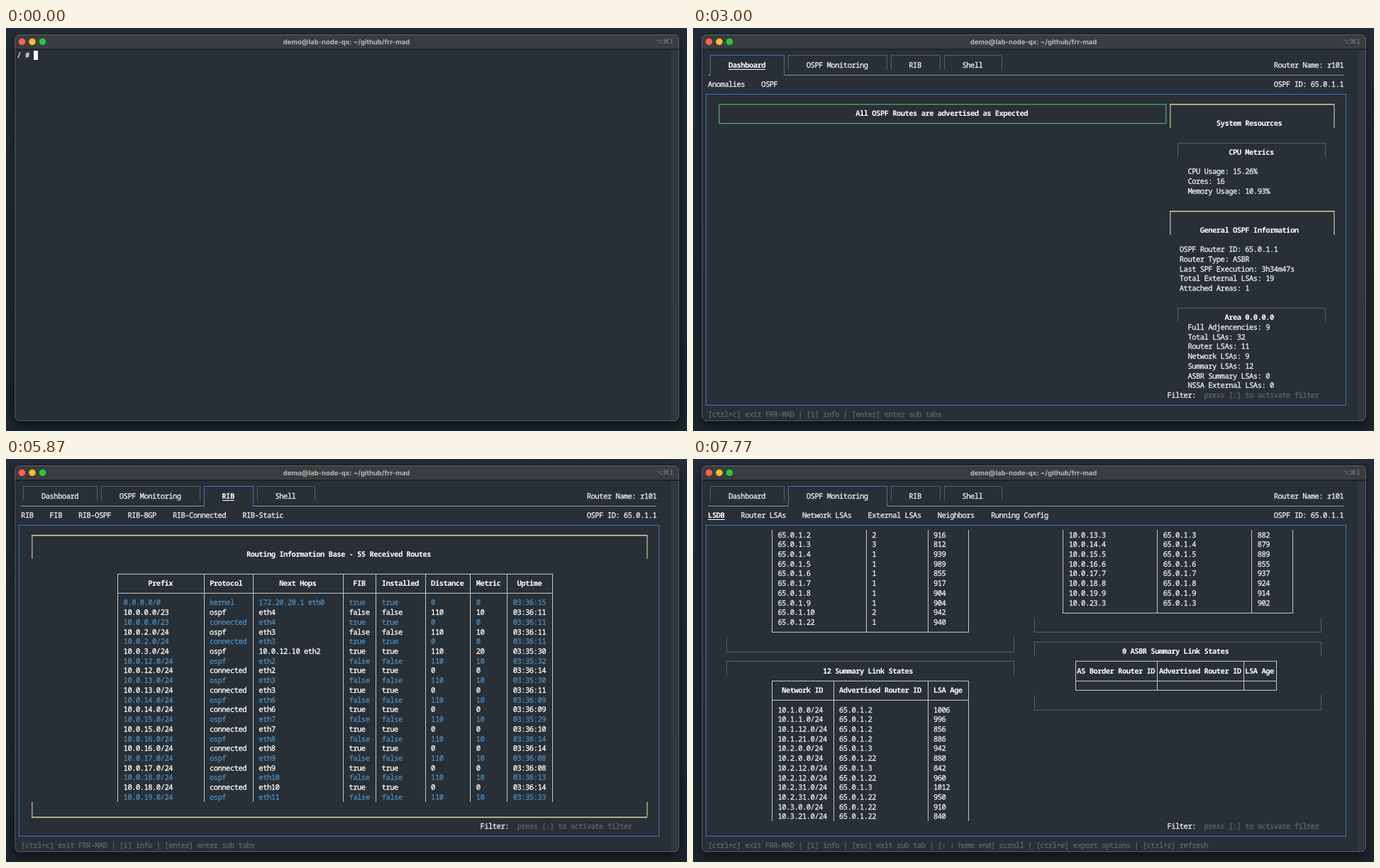
Animation, 960 px wide and 569 px high, one loop 8000 ms. Source, as an HTML page with a canvas:

```html
<!DOCTYPE html>
<html lang="en">
<head>
<meta charset="utf-8">
<title>Terminal routing dashboard</title>
<style>
  html, body { margin: 0; width: 100%; height: 100%; overflow: hidden; background: #1d262f; }
  canvas { display: block; width: 960px; height: 569px; }
</style>
</head>
<body>
<canvas id="stage"></canvas>
<script>
const W = 960, H = 569, LOOP = 8000;
const CW = 5.78, RH = 13.72, X0 = 15.6, Y0 = 31.25;
const MONO = '"Noto Sans Mono", "DejaVu Sans Mono", monospace';
const C = {
  bg: '#282f37', text: '#eceef0', bold: '#ffffff', dim: '#5d646b', frame: '#575e65',
  rule: '#8b9197', table: '#c3c7ca', blue: '#4672b8', row: '#4f8ab8',
  green: '#4c9a5b', gold: '#c9cb9c', goldSide: '#9da27f'
};

const canvas = document.getElementById('stage');
const ctx = canvas.getContext('2d');
const dpr = window.devicePixelRatio || 1;
canvas.width = W * dpr;
canvas.height = H * dpr;
ctx.scale(dpr, dpr);
ctx.textRendering = 'geometricPrecision';
ctx.lineJoin = 'round';

// Grid helpers: left and top edges of a cell, and its centre
const left = c => X0 + c * CW;
const top_ = r => Y0 + r * RH;
const midX = c => left(c + 0.5);
const midY = r => top_(r + 0.5);

function box(x, y, w, h, color) {
  ctx.fillStyle = color;
  ctx.fillRect(x, y, w, h);
}

function hLine(y, x1, x2, color, w = 1) {
  const x = Math.round(x1);
  box(x, Math.round(y), Math.round(x2) + 1 - x, w, color);
}

function vLine(x, y1, y2, color, w = 1) {
  const y = Math.round(y1);
  box(Math.round(x), y, w, Math.round(y2) - y, color);
}

function put(col, row, str, { color, bold = false, under = false } = {}) {
  ctx.font = `${bold ? 'bold ' : ''}10.5px ${MONO}`;
  ctx.textAlign = 'center';
  ctx.textBaseline = 'alphabetic';
  ctx.fillStyle = ctx.strokeStyle = color || (bold ? C.bold : C.text);
  ctx.lineWidth = 0.3;
  const y = midY(row) + 3.7;
  [...str].forEach((ch, i) => {
    if (ch === ' ') return;
    ctx.fillText(ch, midX(col + i), y);
    // A hairline outline gives regular text the heavier terminal weight
    if (!bold) ctx.strokeText(ch, midX(col + i), y);
  });
  if (under) hLine(midY(row) + 6, left(col), left(col + str.length) - 1, C.bold);
}

const head = (col, row, str) => put(col, row, str, { bold: true });

function cap(c1, c2, row, rows, color = C.frame, side = color, w = 1) {
  for (const c of [c1, c2]) vLine(midX(c), midY(row), top_(row + rows), side, w);
  hLine(midY(row), midX(c1), midX(c2) + w - 1, color, w);
}

function foot(c1, c2, row, color = C.frame, side = color, w = 1) {
  for (const c of [c1, c2]) vLine(midX(c), top_(row - 1), midY(row), side, w);
  hLine(midY(row), midX(c1), midX(c2) + w - 1, color, w);
}

const goldCap = (c1, c2, row) => cap(c1, c2, row, 3, C.gold, C.goldSide, 1.6);

function clipRows(first, last, paint) {
  ctx.save();
  ctx.beginPath();
  ctx.rect(0, Math.round(top_(first)), W, Math.round(top_(last + 1)) - Math.round(top_(first)));
  ctx.clip();
  paint();
  ctx.restore();
}

function table(cols, row, heads, rows, rowColor = () => C.text) {
  const end = row + 3 + rows.length, last = cols[cols.length - 1];
  for (const r of [row, row + 2, end]) hLine(midY(r), midX(cols[0]), midX(last), C.table);
  for (const c of cols) vLine(midX(c), midY(row), midY(end), C.table);
  heads.forEach((s, i) => {
    const room = cols[i + 1] - cols[i] - 1;
    head(cols[i] + 1 + Math.floor((room - s.length) / 2), row + 1, s);
  });
  rows.forEach((cells, k) => cells.forEach((s, i) =>
    put(cols[i] + 2, row + 3 + k, s, { color: rowColor(k) })));
}

const split = str => str.trim().split('|').map(s => s.trim().split(' '));

const routerLinks = split(`1 10 904|2 2 916|3 3 812|4 1 939|5 1 989|6 1 855|7 1 917|
  8 1 904|9 1 904|10 2 942|22 1 940`).map(([id, n, age]) => ['65.0.1.' + id, n, age]);
const networkLinks = split(`12.10 10 892|13.3 3 882|14.4 4 879|15.5 5 889|16.6 6 855|
  17.7 7 937|18.8 8 924|19.9 9 914|23.3 3 902`).map(([net, id, age]) => ['10.0.' + net, '65.0.1.' + id, age]);
const summaryLinks = split(`1.0 2 1006|1.1 2 996|1.12 2 856|1.21 2 886|2.0 3 942|2.0 22 880|
  2.12 3 842|2.12 22 960|2.31 3 1012|2.31 22 950|3.0 22 910|3.21 22 840`)
  .map(([net, id, age]) => [`10.${net}.0/24`, '65.0.1.' + id, age]);

function route(prefix, proto, hop, up) {
  const far = hop.includes('.') && proto === 'ospf';
  const ospf = proto === 'ospf', used = String(!ospf || far);
  return [prefix, proto, hop, used, used, ospf ? '110' : '0', far ? '20' : ospf ? '10' : '0', '03:' + up];
}

const routes = [
  route('0.0.0.0/0', 'kernel', '172.20.20.1 eth0', '36:15'),
  route('10.0.0.0/23', 'ospf', 'eth4', '36:11'),
  route('10.0.0.0/23', 'connected', 'eth4', '36:11'),
  route('10.0.2.0/24', 'ospf', 'eth3', '36:11'),
  route('10.0.2.0/24', 'connected', 'eth3', '36:11'),
  route('10.0.3.0/24', 'ospf', '10.0.12.10 eth2', '35:30')
];
const uptimes = '35:32 36:14 35:30 36:11 36:09 36:09 35:29 36:10 36:14 36:14 36:08 36:08 36:13 36:14 35:33'.split(' ');
uptimes.forEach((up, i) => {
  const net = 12 + (i >> 1);
  routes.push(route(`10.0.${net}.0/24`, i % 2 ? 'connected' : 'ospf', 'eth' + (net < 14 ? net - 10 : net - 8), up));
});

function desktop() {
  const g = ctx.createLinearGradient(0, 0, 0, H);
  g.addColorStop(0, '#232d39');
  g.addColorStop(1, '#1b262e');
  box(0, 0, W, H, g);
}

function windowFrame() {
  const shape = (x, y, w, h, r) => {
    ctx.beginPath();
    ctx.roundRect(x, y, w, h, r);
  };
  ctx.save();
  ctx.shadowColor = 'rgba(0,0,0,.55)';
  ctx.shadowBlur = 16 * dpr;
  ctx.shadowOffsetY = 6 * dpr;
  ctx.fillStyle = '#0c0f12';
  shape(11.5, 8.5, 938, 547, 8);
  ctx.fill();
  ctx.restore();

  ctx.save();
  shape(12, 9, 937, 546, 7.5);
  ctx.clip();
  box(12, 9, 938, 547, C.bg);
  box(937, 31, 12, 525, '#30373f');
  box(12, 9, 938, 21, '#3a3d3d');
  box(12, 29.5, 938, 1, '#0d1013');
  ctx.restore();

  ctx.strokeStyle = 'rgba(150,156,160,.4)';
  ctx.lineWidth = 1;
  shape(12.5, 9.5, 936, 545, 7);
  ctx.stroke();

  ['#ff5f57', '#febc2e', '#28c840'].forEach((color, i) => {
    ctx.fillStyle = color;
    ctx.beginPath();
    ctx.arc(22.5 + i * 14.5, 19.4, 4.7, 0, 7);
    ctx.fill();
  });

  ctx.textBaseline = 'alphabetic';
  ctx.font = 'bold 9.5px Inter, sans-serif';
  ctx.textAlign = 'center';
  ctx.fillStyle = '#b6b9b9';
  ctx.fillText('demo@lab-node-qx: ~/github/frr-mad', 480, 22.6);
  ctx.font = '9px "DejaVu Sans", sans-serif';
  ctx.textAlign = 'right';
  ctx.fillStyle = '#7d8181';
  ctx.fillText('⌥⌘1', 941, 22.4);
}

const tabs = [
  { name: 'Dashboard', c1: 1, c2: 19, subs: ['Anomalies', 'OSPF'] },
  { name: 'OSPF Monitoring', c1: 20, c2: 44,
    subs: ['LSDB', 'Router LSAs', 'Network LSAs', 'External LSAs', 'Neighbors', 'Running Config'] },
  { name: 'RIB', c1: 45, c2: 57, subs: ['RIB', 'FIB', 'RIB-OSPF', 'RIB-BGP', 'RIB-Connected', 'RIB-Static'] },
  { name: 'Shell', c1: 58, c2: 72, subs: [] }
];

function chrome(active, inSub) {
  tabs.forEach((tab, i) => {
    const on = i === active, mark = on && !inSub;
    cap(tab.c1, tab.c2, 0, 2, on ? C.blue : C.frame);
    put(tab.c1 + 5, 1, tab.name, { bold: mark, under: mark });
  });
  const { c1, c2, subs } = tabs[active], y = midY(2);
  hLine(y, left(1), midX(c1), C.rule);
  hLine(y, midX(c2), left(156) - 1, C.rule);
  for (const c of [c1, c2]) vLine(midX(c), midY(0), y + 1, C.blue);

  let col = 1;
  subs.forEach((s, i) => {
    const mark = inSub && i === 0;
    put(col, 3, s, { bold: mark, under: mark });
    col += s.length + 4;
  });
  put(139, 1, 'Router Name: r101');
  put(139, 3, 'OSPF ID: 65.0.1.1');

  for (const r of [4, 36]) hLine(midY(r), midX(0), midX(156), C.blue);
  for (const c of [0, 156]) vLine(midX(c), midY(4), midY(36), C.blue);

  put(113, 35, 'Filter:');
  put(122, 35, 'press [:] to activate filter', { color: C.dim });
  put(1, 37, '[ctrl+c] exit FRR-MAD | [i] info | ' + (inSub
    ? '[esc] exit sub tab | [↑ ↓ home end] scroll | [ctrl+e] export options | [ctrl+r] refresh'
    : '[enter] enter sub tabs'), { color: C.dim });
}

function dashboard() {
  const list = (col, row, items) => items.forEach((s, i) => put(col, row + i, s));
  chrome(0, false);
  for (const r of [5, 7]) hLine(midY(r), midX(3), midX(112), C.green, 1.5);
  for (const c of [3, 112]) vLine(midX(c), midY(5), midY(7) + 1, C.green, 1.5);
  head(37, 6, 'All OSPF Routes are advertised as Expected');

  goldCap(113, 153, 5);
  head(125, 7, 'System Resources');
  cap(115, 151, 9, 2);
  head(128, 10, 'CPU Metrics');
  list(118, 12, ['CPU Usage: 15.26%', 'Cores: 16', 'Memory Usage: 10.93%']);

  goldCap(113, 153, 16);
  head(121, 18, 'General OSPF Information');
  list(116, 20, ['OSPF Router ID: 65.0.1.1', 'Router Type: ASBR', 'Last SPF Execution: 3h34m47s',
    'Total External LSAs: 19', 'Attached Areas: 1']);
  cap(115, 151, 26, 2);
  head(127, 27, 'Area 0.0.0.0');
  list(118, 28, ['Full Adjencencies: 9', 'Total LSAs: 32', 'Router LSAs: 11', 'Network LSAs: 9',
    'Summary LSAs: 12', 'ASBR Summary LSAs: 0', 'NSSA External LSAs: 0']);
}

function linkStates(inSub, scroll) {
  const adv = 'Advertised Router ID', age = 'LSA Age';
  chrome(1, inSub);
  clipRows(5, 34, () => {
    ctx.translate(0, -Math.round(scroll * RH));
    goldCap(3, 153, 5);
    head(62, 7, 'Link State Database: Area 0.0.0.0');

    cap(5, 75, 9, 2);
    head(30, 10, '11 Router Link States');
    table([16, 39, 54, 64], 11, [adv, 'Router Links', age], routerLinks);
    foot(5, 75, 27);

    cap(80, 150, 9, 2);
    head(105, 10, '9 Network Link States');
    table([87, 110, 133, 143], 11, ['Designated Router ID', adv, age], networkLinks);
    foot(80, 150, 25);

    cap(80, 150, 26, 2);
    head(102, 27, '0 ASBR Summary Link States');
    table([90, 110, 131, 139], 28, ['AS Border Router ID', adv, age], []);
    foot(80, 150, 33);

    cap(5, 75, 28, 2);
    head(29, 29, '12 Summary Link States');
    table([16, 31, 54, 64], 30, ['Network ID', adv, age], summaryLinks);
  });
}

function rib() {
  chrome(2, false);
  goldCap(3, 153, 5);
  head(56, 7, 'Routing Information Base - 55 Received Routes');
  clipRows(9, 32, () => table([24, 45, 57, 79, 87, 99, 110, 119, 130], 9,
    ['Prefix', 'Protocol', 'Next Hops', 'FIB', 'Installed', 'Distance', 'Metric', 'Uptime'],
    routes, k => k % 2 ? C.bold : C.row));
  foot(3, 153, 34, C.gold, C.goldSide, 1.6);
}

function shell(typed, entered) {
  put(0, 0, '/ # ' + typed);
  const col = entered ? 0 : 4 + typed.length, row = entered ? 1 : 0;
  box(Math.round(left(col)), Math.round(top_(row)) + 1, 6, 13, '#ffffff');
}

// Start time of each screen
const scenes = [
  [0, () => shell('')],
  [900, () => shell('f')],
  [1100, () => shell('fr')],
  [1230, () => shell('frr')],
  [1500, () => shell('frr-tui ')],
  [2030, () => shell('frr-tui ', true)],
  [2170, () => {}],
  [2230, dashboard],
  [3070, () => linkStates(false, 0)],
  [4230, rib],
  [6030, () => linkStates(false, 0)],
  [6630, () => linkStates(true, 0)],
  [7570, () => linkStates(true, 10)]
];

let shown = null;
function tick(now) {
  const t = now % LOOP;
  const scene = scenes.findLast(s => s[0] <= t) || scenes[0];
  if (scene !== shown) {
    shown = scene;
    desktop();
    windowFrame();
    scene[1]();
  }
  requestAnimationFrame(tick);
}
tick(performance.now());
</script>
</body>
</html>
```
